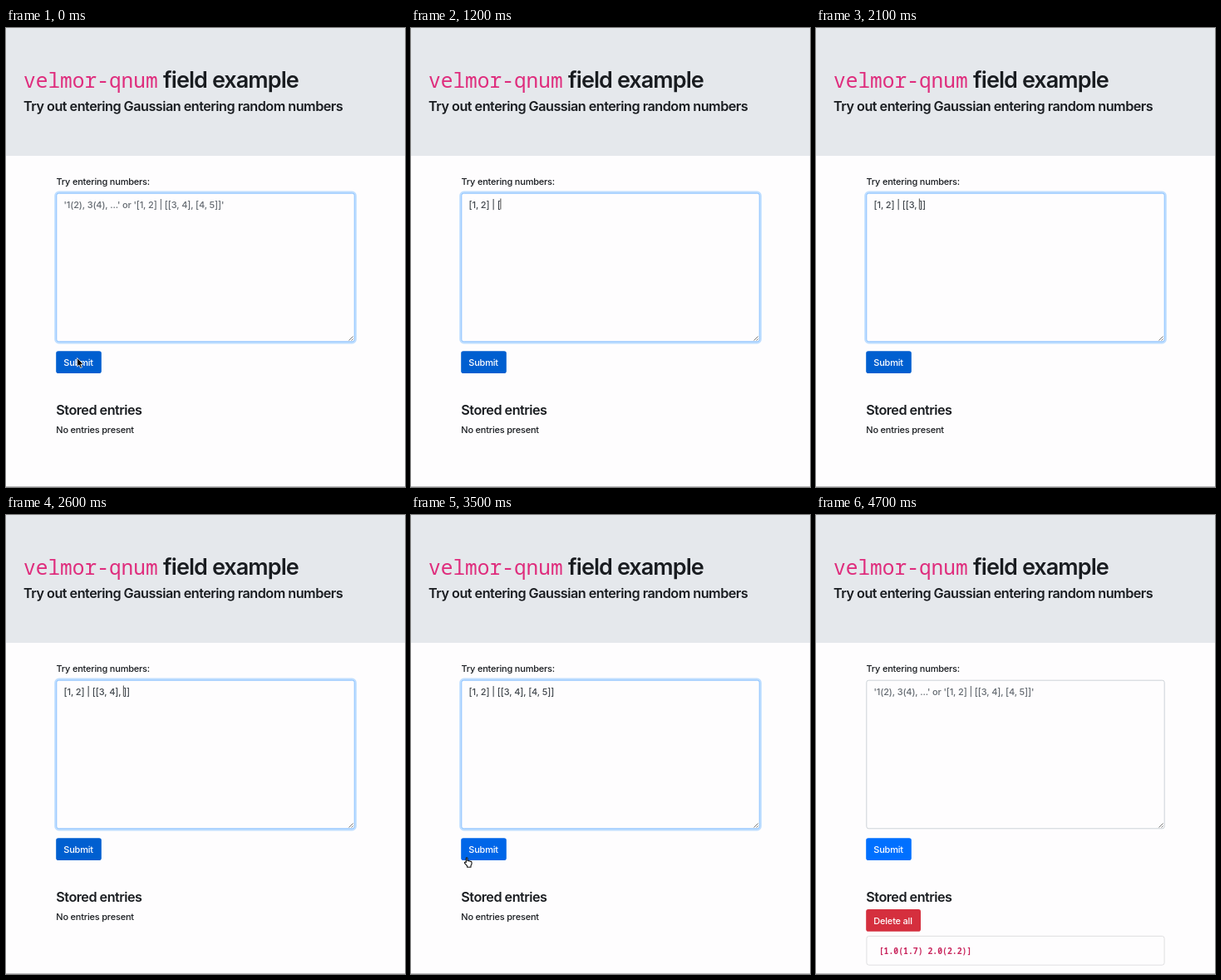
Write an HTML page that moves like this. It is 480 by 553 pixels and loops after 4.8 s.

```html
<!DOCTYPE html>
<html lang="en">
<head>
<meta charset="utf-8">
<title>Field example</title>
<style>
  html, body { margin: 0; width: 100%; height: 100%; overflow: hidden; background: #fefdfe; }
  svg { display: block; }
  text { font: 500 11px Inter, "Open Sans", sans-serif; font-optical-sizing: none; letter-spacing: -.2px; white-space: pre; fill: #191c20; }
  text.h1 { font-size: 27px; font-weight: 600; letter-spacing: -.92px; }
  text.h4 { font-size: 16.2px; font-weight: 600; letter-spacing: -.5px; }
  text.code { font: 600 9.8px "Noto Sans Mono", "DejaVu Sans Mono", monospace; letter-spacing: 0; fill: #c9255d; }
  text.big { font-size: 24.5px; font-weight: 500; fill: #df2d7d; }
  text.field { letter-spacing: -.11px; fill: #41474d; }
  text.hint { letter-spacing: -.13px; fill: #646a71; }
  text.label { fill: #fff; }
</style>
</head>
<body>
<svg width="480" height="553" viewBox="0 0 480 553">
  <rect width="480" height="154" fill="#e5e8ec"/>
  <text class="code big" x="21" y="72">velmor-qnum</text>
  <text class="h1" x="189" y="72">field example</text>
  <text class="h4" x="21" y="100">Try out entering Gaussian entering random numbers</text>

  <text x="60.5" y="189">Try entering numbers:</text>
  <rect id="ring" x="59.5" y="197.9" width="361" height="181.2" rx="4" fill="none" stroke="#bfdeff" stroke-width="2.6"/>
  <rect id="box" x="60.8" y="199.2" width="358.4" height="178.6" rx="2.6" fill="#fefdfe" stroke-width=".9"/>
  <path d="M412.5 376.5l5-5M415.5 376.5l2-2" stroke="#555" stroke-width=".8"/>
  <text id="hint" class="field hint" x="69.5" y="216.5">'1(2), 3(4), ...' or '[1, 2] | [[3, 4], [4, 5]]'</text>
  <text id="typed" class="field" x="69.5" y="216.5"></text>
  <rect id="caret" y="205.5" width=".9" height="13" fill="#333"/>

  <rect id="submit" x="60.2" y="389.2" width="54.6" height="26.8" rx="2.8"/>
  <text class="label" x="69.3" y="406.5">Submit</text>

  <text class="h4" x="60.3" y="466">Stored entries</text>
  <text id="none" x="60.3" y="487.5">No entries present</text>
  <g id="stored">
    <rect x="60.2" y="475" width="65.8" height="26.7" rx="2.8" fill="#d52f3e"/>
    <text class="label" x="69.3" y="492.5">Delete all</text>
    <rect x="60.9" y="507.4" width="358.2" height="34.8" rx="2.8" fill="#fefdfe" stroke="#dcdcde" stroke-width=".9"/>
    <text class="code" x="75.7" y="529">[1.0(1.7) 2.0(2.2)]</text>
  </g>
  <rect y="552" width="480" height="1" fill="#bcbcbe"/>

  <path id="arrow" transform="translate(85.6 397.5)" d="M0 0V10.6L2.4 8.4 4 12 5.9 11.2 4.3 7.7H7.6Z" fill="#000" stroke="#fff" stroke-width=".8"/>
  <path id="hand" d="M2.3 6.6V1.3Q3.1 .1 3.9 1.3V4.6Q5 3.9 5.6 4.9 6.7 4.4 7.3 5.4 8.8 5 9 6.6V8.6L8 10.6V12.2H3.6V10.8L.5 7.3Q.3 6 1.4 6.1Z" fill="#fff" stroke="#111" stroke-width="1.1" stroke-linejoin="round"/>
</svg>
<script>
const LOOP = 4800, STEP = 100, FIRST_KEY = 3, SENT = 37;
// One key per step: < moves the caret left, _ is a pause.
const KEYS = "[1, 2] | [[]]<<3, _4_], [4, _5";
const el = id => document.getElementById(id);
const show = (id, on) => el(id).style.display = on ? "" : "none";

function type(count) {
  let text = "", pos = 0;
  for (const key of KEYS.slice(0, Math.max(0, count))) {
    if (key === "<") pos--;
    else if (key !== "_") {
      text = text.slice(0, pos) + key + text.slice(pos);
      pos++;
    }
  }
  return { text, pos };
}

function draw(step) {
  const sent = step >= SENT;
  const { text, pos } = type(sent ? 0 : step - FIRST_KEY + 1);
  const typed = el("typed");
  typed.textContent = text;
  show("hint", !text);
  show("caret", text && step < 33);
  if (pos) el("caret").setAttribute("x", 69.2 + typed.getSubStringLength(0, pos));

  show("ring", !sent);
  el("box").setAttribute("stroke", sent ? "#c8ced4" : "#80bdff");
  el("submit").setAttribute("fill", sent ? "#0070ff" : step < 35 ? "#005fd0" : "#0066e8");
  show("none", !sent);
  show("stored", sent);

  show("arrow", step < FIRST_KEY);
  show("hand", step >= 34 && step < 41);
  const move = Math.min(1, Math.max(0, (step - 35) / 2));
  el("hand").setAttribute("transform", `translate(${64 + 5 * move} ${412 - 5.5 * move})`);
}

let last = -1;
function tick() {
  const step = Math.floor(performance.now() % LOOP / STEP);
  if (step !== last) draw(last = step);
  requestAnimationFrame(tick);
}
tick();
</script>
</body>
</html>
```
